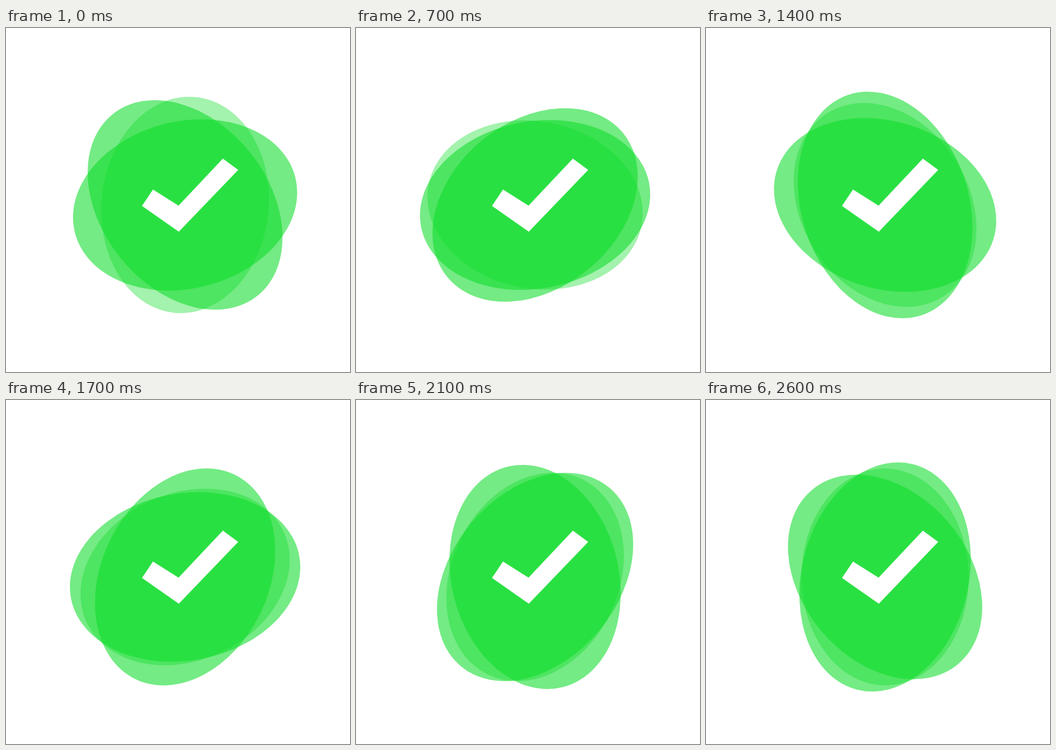
An HTML page for the animation above (2700 ms loop, 640 by 640 pixels).

```html
<!DOCTYPE html>
<html lang="en">
<head>
<meta charset="utf-8">
<title>Spinning check badge</title>
<style>
  html, body { margin: 0; width: 100%; height: 100%; overflow: hidden; background: #fff; }
  svg { display: block; width: 100%; height: 100%; }
  ellipse { fill: #11dd2b; }
</style>
</head>
<body>
<svg viewBox="0 0 640 640">
  <g id="badge" transform="translate(333.2 329.2)"></g>
  <path fill="#fff" d="M403.5 243 432 264 321.5 379 253 331 273.5 300.5 321 330.5Z"/>
</svg>
<script>
  const LOOP = 2700, HOLD = 100, TICK = 40, LAST = 2520;
  const SYNC = 800;        // from here on all blobs turn together
  const SYNC_SPEED = 0.35; // degrees per ms

  const blobs = [
    { rx: 201.7, opacity: 0.385, start: 95.6, speed: 0.14 },
    { rx: 211.4, opacity: 0.58, start: 166, speed: 0.2275 },
    { rx: 216, opacity: 0.58, start: 51.6, speed: 0.4375 }
  ];

  const badge = document.getElementById('badge');
  for (const blob of blobs) {
    blob.el = document.createElementNS('http://www.w3.org/2000/svg', 'ellipse');
    blob.el.setAttribute('rx', blob.rx);
    blob.el.setAttribute('ry', 155.5);
    blob.el.setAttribute('fill-opacity', blob.opacity);
    badge.append(blob.el);
  }

  const snap = (value, step) => Math.floor(value / step) * step;

  function angle({ start, speed }, t) {
    return start + speed * Math.min(t, SYNC) + SYNC_SPEED * Math.max(0, t - SYNC);
  }

  // Poses hold for 100 ms and follow a 40 ms clock that stops at LAST.
  function draw(ms) {
    const t = Math.min(snap(snap(ms % LOOP, HOLD), TICK), LAST);
    for (const blob of blobs) {
      blob.el.setAttribute('transform', `rotate(${angle(blob, t)})`);
    }
  }

  const began = performance.now();
  function loop() {
    draw(performance.now() - began);
    requestAnimationFrame(loop);
  }
  loop();
</script>
</body>
</html>
```
